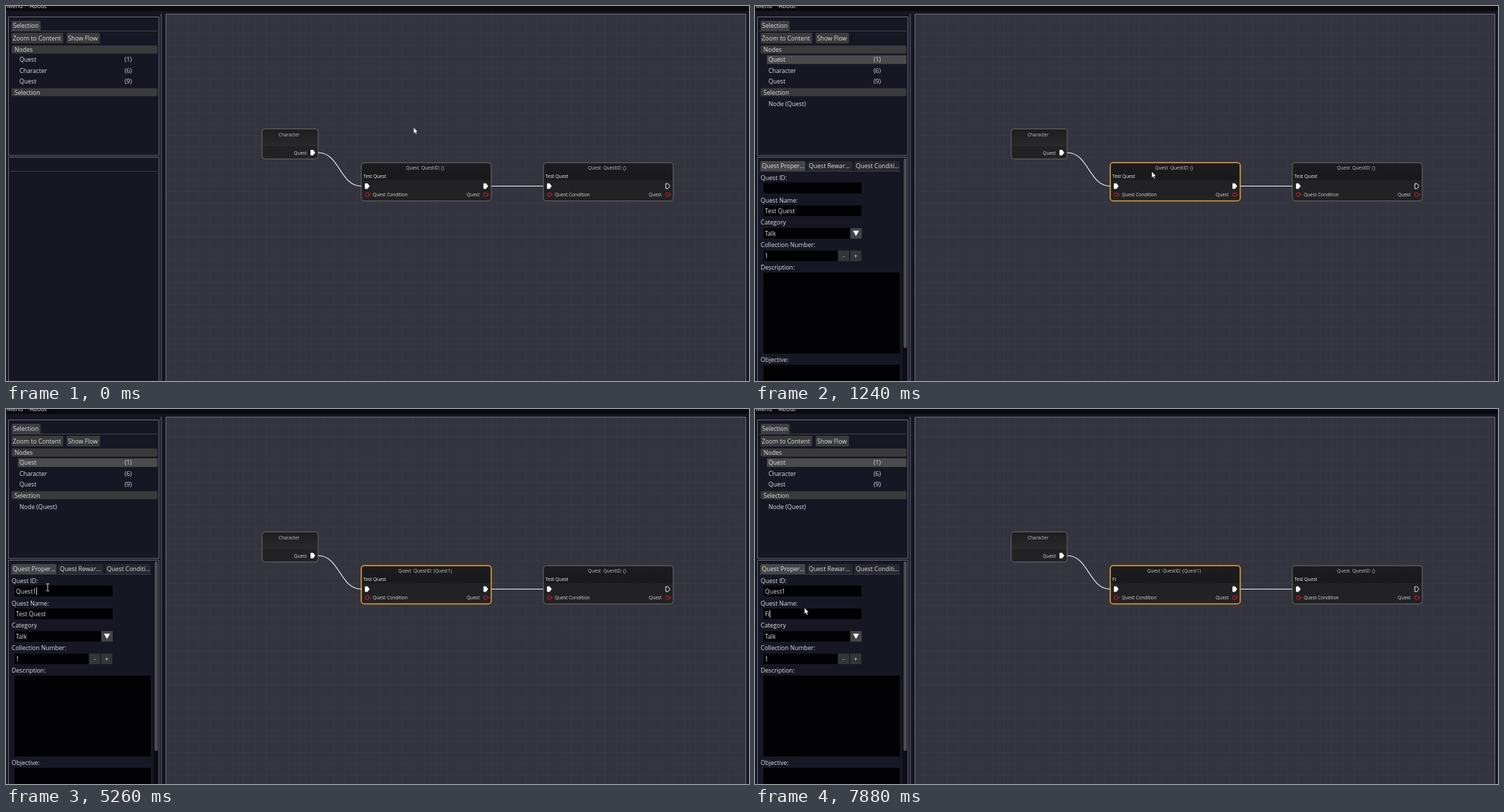
Animation, 1052 px wide and 532 px high, one loop 8 s. Source, as an HTML page with a canvas:

```html
<!DOCTYPE html>
<html lang="en">
<head>
<meta charset="utf-8">
<title>Quest node editor</title>
<style>
  html, body { margin: 0; width: 100%; height: 100%; overflow: hidden; background: #161622; }
  canvas { display: block; }
</style>
</head>
<body>
<canvas id="stage" width="1052" height="532"></canvas>
<script>
const ctx = document.getElementById('stage').getContext('2d');
const LOOP = 8000;
const SELECT_AT = 1000, PANEL_AT = 1030, FOCUS_ID_AT = 1960, FOCUS_NAME_AT = 6350;
const UI = 8.6, NODE = 6.55;
const ID_KEYS = [3870, 4110, 4260, 4440, 4560, 4770];
const NAME_KEYS = [7700, 7880];

// time, x, y
const POINTER = [
  [0, 577, 172], [310, 577, 172], [640, 567, 235], [1210, 567, 235],
  [1560, 330, 229], [1960, 79, 257], [2100, 79, 257], [2140, 80, 255],
  [5259, 80, 255], [5260, 59, 253], [5290, 57, 253], [5530, 57, 253],
  [5920, 108, 276], [6350, 85, 290], [6620, -2, 287], [6840, -2, 287],
  [7170, 70, 282], [LOOP, 70, 282]
];

function pointerAt(t) {
  const i = POINTER.findIndex(key => key[0] > t);
  const [t0, x0, y0] = POINTER[i - 1], [t1, x1, y1] = POINTER[i];
  const u = (t - t0) / (t1 - t0), s = u * u * (3 - 2 * u);
  return { x: x0 + (x1 - x0) * s, y: y0 + (y1 - y0) * s };
}

const within = (p, x0, y0, x1, y1) => p.x >= x0 && p.x <= x1 && p.y >= y0 && p.y <= y1;
const typed = (text, keys, t) => text.slice(0, keys.filter(k => k <= t).length);
const caretOn = age => age < 1100 || (age - 300) % 1200 < 800;

function box(x0, y0, x1, y1, fill, radius = 0, stroke, width = 1) {
  ctx.beginPath();
  ctx.roundRect(x0, y0, x1 - x0, y1 - y0, radius);
  if (fill) { ctx.fillStyle = fill; ctx.fill(); }
  if (stroke) { ctx.strokeStyle = stroke; ctx.lineWidth = width; ctx.stroke(); }
}

function text(str, x, y, size = UI, color = '#dedee2', align = 'left') {
  ctx.font = `${size}px "Open Sans", "Noto Sans", sans-serif`;
  ctx.textAlign = align;
  ctx.fillStyle = color;
  ctx.fillText(str, x, y);
}

function path(d, x, y, fill, stroke, width = 1) {
  const shape = new Path2D(d);
  ctx.save();
  ctx.translate(x, y);
  if (fill) { ctx.fillStyle = fill; ctx.fill(shape); }
  if (stroke) { ctx.strokeStyle = stroke; ctx.lineWidth = width; ctx.stroke(shape); }
  ctx.restore();
}

function drawFrame() {
  box(0, 0, 1052, 532, '#161622');
  box(0, 0, 1052, 7, '#09090e');
  text('Menu', 1, 3);
  text('About', 33.5, 3);
  box(218.5, 11, 221, 540, '#3c3c4b');
  box(3.5, 15.5, 216.5, 212, '#171724', 0, '#666676');
  box(3.5, 214.5, 216.5, 540, '#171724', 0, '#666676');
  box(226.5, 11.5, 1047.5, 540, '#34343e');
  ctx.fillStyle = 'rgba(120,120,130,.07)';
  for (let x = 240; x < 1047; x += 16) ctx.fillRect(x, 12, 1, 520);
  for (let y = 23; y < 532; y += 16) ctx.fillRect(227, y, 820, 1);
  box(226.5, 11.5, 1047.5, 540, null, 0, '#6e6e7f');
}

function drawOutline(selected) {
  box(8, 21, 49, 35, '#3e3e42', [2, 2, 0, 0]);
  box(6, 35, 214, 36, '#42424b');
  text('Selection', 10, 31.3);
  for (const [label, x0, x1] of [['Zoom to Content', 8, 81], ['Show Flow', 86, 133]]) {
    box(x0, 38, x1, 53, '#3b3b3d', 1);
    text(label, x0 + 1.7, 48.9);
  }
  for (const [label, y] of [['Nodes', 56], ['Selection', 116.5]]) {
    box(8, y, 214.5, y + 11.5, '#3a3a3b', 2);
    text(label, 12, y + 9);
  }
  if (selected) {
    box(17, 70, 214.5, 82.3, '#4b4b4d');
    text('Node (Quest)', 19, 142);
  }
  [['Quest', 1], ['Character', 6], ['Quest', 9]].forEach(([label, count], i) => {
    text(label, 19, 79.2 + i * 15.3);
    text(`(${count})`, 168, 79.2 + i * 15.3);
  });
}

function field(x1, y0, y1, value) {
  box(12, y0, x1, y1, '#020204');
  if (value) text(value, 14, y0 + 11);
}

function caret(value, y) {
  ctx.font = `${UI}px "Open Sans", "Noto Sans", sans-serif`;
  box(14 + ctx.measureText(value).width, y, 15 + ctx.measureText(value).width, y + 11, '#d8d8d8');
}

function drawProperties(t, questId, questName, pointer) {
  box(209, 215, 216, 532, '#0d0d16');
  box(210.3, 216, 215, 485, '#4d4d52', 2);
  ['Quest Proper...', 'Quest Rewar...', 'Quest Conditi...'].forEach((label, i) => {
    const x = 7.5 + i * 66.5;
    box(x, 220, x + 64, 234, i ? '#28282e' : '#464649', [2, 2, 0, 0]);
    text(label, x + 2.3, 230.3);
  });
  [['Quest ID:', 246.6], ['Quest Name:', 278.5], ['Category', 310.4],
   ['Collection Number:', 342.2], ['Description:', 374.1], ['Objective:', 505]]
    .forEach(([label, y]) => text(label, 8, y));

  field(151, 250.5, 266, questId);
  field(151, 283, 298);
  if (t >= FOCUS_NAME_AT && t < NAME_KEYS[0]) {
    const left = t < 6870 ? Math.max(14, Math.min(57, pointer.x)) : 14;
    box(left, 284.5, 57.5, 297, '#56565a');
  }
  text(questName, 14, 294.2);
  field(134.5, 315, 330, 'Talk');
  box(135, 315, 151, 330, '#444447');
  path('M-4.3-3.7H4.3L0 4Z', 143, 322.5, '#f2f2f2');
  field(116.5, 347, 362, '1');
  for (const [sign, x] of [['-', 118], ['+', 135]]) {
    box(x, 347, x + 15.5, 362, '#353538');
    text(sign, x + 7.7, 358, UI, '#dedee2', 'center');
  }
  field(205, 378, 493);
  field(205, 509, 540);

  if (t >= FOCUS_ID_AT && t < FOCUS_NAME_AT) {
    const lastEdit = Math.max(...[FOCUS_ID_AT, ...ID_KEYS].filter(k => k <= t));
    if (caretOn(t - lastEdit)) caret(questId, 253);
  }
  if (t >= NAME_KEYS[0]) caret(questName, 285.5);
}

const FLOW = 'M-2.6-3.5H.6L3.2 0L.6 3.5H-2.6Z';
const flowPin = (x, y, filled = true) => path(FLOW, x, y, filled ? '#fff' : '#202023', '#fff', .9);

function valuePin(x, y) {
  path('M2.6 0A2.6 2.6 0 1 1-2.6 0A2.6 2.6 0 1 1 2.6 0Z', x, y, '#241c1f', '#d3232b', 1);
  path('M3.4-1.3L5 0L3.4 1.3Z', x, y, '#d3232b');
}

function nodeBox(x0, y0, x1, y1, headerBottom, border, width) {
  box(x0, y0, x1, y1, '#222225', 4);
  const header = ctx.createLinearGradient(0, y0, 0, headerBottom);
  header.addColorStop(0, '#1d1d1f');
  header.addColorStop(1, y1 - y0 < 50 ? '#2a2a2c' : '#19191b');
  box(x0 + 1, y0 + 1, x1 - 1, headerBottom, header, [3, 3, 0, 0]);
  box(x0, y0, x1, y1, null, 4, border, width);
}

function questNode(x, id, name, border, width, linkedOut) {
  nodeBox(x, 222.3, x + 184, 276.5, 247, border, width);
  text(`Quest  QuestID: (${id})`, x + 90.2, 232.4, NODE, '#c6c6c8', 'center');
  text(name, x + 3, 243.8, NODE, '#f4f4f4');
  flowPin(x + 8.2, 255.5);
  flowPin(x + 176, 255.5, linkedOut);
  valuePin(x + 8.3, 267.6);
  valuePin(x + 176, 267.6);
  text('Quest Condition', x + 16.2, 270, NODE, '#d8d8da');
  text('Quest', x + 167.5, 270, NODE, '#d8d8da', 'right');
}

function drawGraph(t, questId, questName, pointer) {
  const selected = t >= SELECT_AT;
  const hovered = within(pointer, 503, 222, 687, 277);
  const border = selected ? '#e3a03a' : hovered ? '#32a8f0' : '#68686c';

  nodeBox(362.7, 174.3, 442, 217, 199, '#68686c', 1);
  text('Character', 400.8, 184.8, NODE, '#c6c6c8', 'center');
  text('Quest', 425.8, 210.6, NODE, '#d8d8da', 'right');
  flowPin(434.2, 208);
  questNode(503, questId, questName, border, selected || hovered ? 1.5 : 1, true);
  questNode(760.8, '', 'Test Quest', '#68686c', 1, false);
  path('M442 208C472 208 473 255.5 503 255.5M687.5 255.5H760.5', 0, 0, null, '#f0f0f0', 1.2);
}

function drawPointer(t, p) {
  const dragging = t >= FOCUS_NAME_AT && t < 6870;
  const overField = t >= PANEL_AT &&
    (within(p, 12, 250, 151, 266) || within(p, 12, 283, 151, 298));
  if (dragging || overField) {
    path('M-2.3-5H-.6L0-4.5L.6-5H2.3M0-4.5V4.5M-2.3 5H-.6L0 4.5L.6 5H2.3', p.x, p.y, null, '#e8e8e8', .9);
  } else {
    path('M0 0V9L2 7.2L3.4 10.3L4.9 9.6L3.6 6.7L6.2 6.4Z', p.x, p.y, '#fff', '#111', .6);
  }
}

function draw(now) {
  const t = now % LOOP;
  const pointer = pointerAt(t);
  const questId = typed('Quest1', ID_KEYS, t);
  const questName = t < NAME_KEYS[0] ? 'Test Quest' : typed('Fi', NAME_KEYS, t);

  drawFrame();
  drawOutline(t >= SELECT_AT);
  box(6, 234, t < PANEL_AT ? 214 : 206, 235, '#3a3a46');
  if (t >= PANEL_AT) drawProperties(t, questId, questName, pointer);
  drawGraph(t, questId, questName, pointer);
  drawPointer(t, pointer);
}

const start = performance.now();
function tick() {
  draw(performance.now() - start);
  requestAnimationFrame(tick);
}
tick();
</script>
</body>
</html>
```
